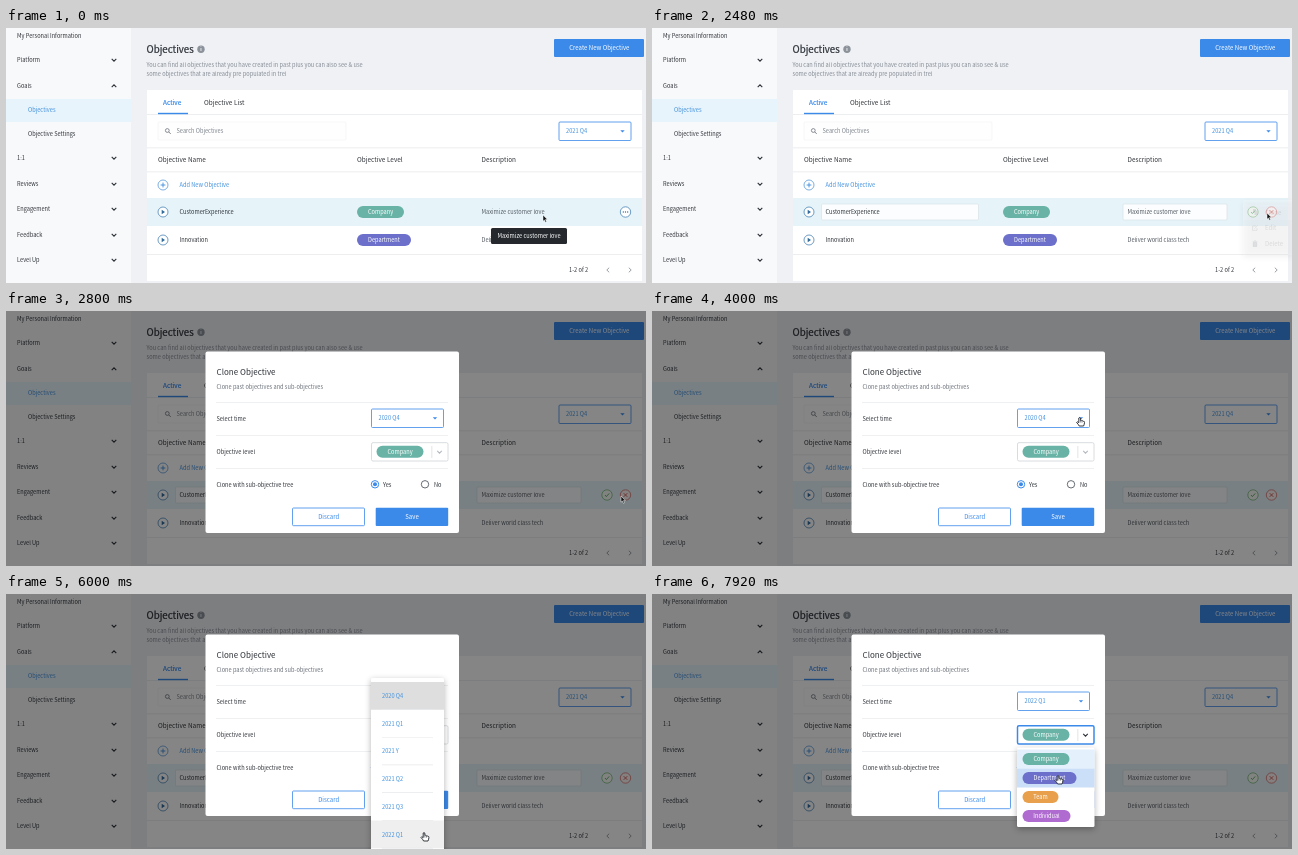
An HTML page with a canvas that plays this animation: 640x255 px, repeating every 8000 ms.

```html
<!DOCTYPE html>
<html lang="en">
<head>
<meta charset="utf-8">
<title>Objectives</title>
<style>
  html, body { margin: 0; width: 100%; height: 100%; overflow: hidden; }
  canvas { display: block; }
</style>
</head>
<body>
<canvas id="stage" width="640" height="255"></canvas>
<script>
const ctx = document.getElementById('stage').getContext('2d');
const LOOP = 8000, STEP = 80;
const FAMILY = '"Noto Sans CJK JP", "Noto Sans CJK SC", "Noto Sans CJK", "Open Sans", sans-serif';
const INK = '#2f3339', GREY = '#7d838b', PALE = '#e6e8eb', BLUE = '#3b8aea', LINK = '#3f8fdd';
const LEVELS = {
  Company: ['#69b3a6', 47], Department: ['#6c70ca', 54],
  Team: ['#e8a04c', 36], Individual: ['#b06bd0', 48]
};
const PERIODS = ['2020 Q4', '2021 Q1', '2021 Y', '2021 Q2', '2021 Q3', '2022 Q1'];

// Pointer keyframes: time, x, y
const POINTER = [
  [0, 537, 187], [80, 537, 187], [800, 619, 183], [1040, 618, 183], [1280, 616, 185],
  [1760, 616, 185], [2560, 615, 185], [2880, 615, 185], [3840, 428, 107], [4400, 426, 107],
  [4960, 426, 115], [5280, 424, 118], [6000, 418, 239], [6240, 418, 239], [6640, 422, 163],
  [6960, 433, 140], [7200, 433, 140], [7760, 408, 180], [7920, 406, 182]
];

const ramp = (t, from, to) => Math.min(1, Math.max(0, (t - from) / (to - from)));
const during = (t, from, to) => t >= from && t < to;

function pointerAt(t) {
  const i = POINTER.findIndex(p => p[0] > t);
  if (i < 0) return POINTER[POINTER.length - 1].slice(1);
  const [t0, x0, y0] = POINTER[i - 1], [t1, x1, y1] = POINTER[i];
  const u = ramp(t, t0, t1), e = u * u * (3 - 2 * u);
  return [x0 + (x1 - x0) * e, y0 + (y1 - y0) * e];
}

// Text is laid out large and scaled down, so small advances stay exact. y is the middle of the capitals.
function text(str, x, y, color = INK, px = 14, align = 'left', bold = 0) {
  ctx.save();
  ctx.translate(x, y + px * 0.148);
  ctx.scale(0.1, 0.1);
  ctx.font = `${px * 4.03}px ${FAMILY}`;
  ctx.textAlign = align;
  ctx.fillStyle = ctx.strokeStyle = color;
  ctx.fillText(str, 0, 0);
  if (bold) {
    ctx.lineWidth = bold * 10;
    ctx.strokeText(str, 0, 0);
  }
  ctx.restore();
}

function paint(fill, stroke, width = 0.8) {
  if (fill) { ctx.fillStyle = fill; ctx.fill(); }
  if (stroke) { ctx.strokeStyle = stroke; ctx.lineWidth = width; ctx.stroke(); }
}

function box(x, y, w, h, fill, stroke, r = 0, width) {
  ctx.beginPath();
  ctx.roundRect(x, y, w, h, r);
  paint(fill, stroke, width);
}

function circle(x, y, r, fill, stroke, width) {
  ctx.beginPath();
  ctx.arc(x, y, r, 0, 7);
  paint(fill, stroke, width);
}

function path(d, x, y, fill, stroke, width) {
  ctx.save();
  ctx.translate(x, y);
  const p = new Path2D(d);
  if (fill) { ctx.fillStyle = fill; ctx.fill(p); }
  if (stroke) { ctx.strokeStyle = stroke; ctx.lineWidth = width || 1; ctx.stroke(p); }
  ctx.restore();
}

function panel(x, y, w, h) {
  ctx.save();
  ctx.shadowColor = 'rgba(0,0,0,.3)';
  ctx.shadowBlur = 6;
  ctx.shadowOffsetY = 2;
  box(x, y, w, h, '#fff', null, 1.5);
  ctx.restore();
}

function faded(alpha, draw) {
  if (alpha <= 0) return;
  ctx.save();
  ctx.globalAlpha = alpha;
  draw();
  ctx.restore();
}

const line = (x, y, w, color = PALE) => box(x, y, w, 0.7, color);
const chevron = (x, y, color, up) => path(up ? 'M-2.3 1.2L0-1.2L2.3 1.2' : 'M-2.3-1.2L0 1.2L2.3-1.2', x, y, null, color, 1.1);
const caret = (x, y) => path('M-2.2-1.1H2.2L0 1.3Z', x, y, BLUE);

function pill(level, x, y) {
  const [color, w] = LEVELS[level];
  box(x, y - 6, w, 12, color, null, 6);
  text(level, x + w / 2, y, '#fff', 14, 'center');
}

function periodSelect(value, x, y, focused) {
  box(x, y, 72, 18.5, focused ? '#eef0f2' : '#fff', BLUE, 1, focused ? 1.6 : 0.8);
  text(value, x + 7, y + 9.3, LINK);
  caret(x + 63.5, y + 9.3);
}

function sidebar() {
  box(0, 0, 125, 255, '#f8f9fa');
  box(0, 71, 125, 23, '#e8f4fb');
  text('My Personal Information', 11, 8);
  text('Objectives', 22, 82, LINK);
  text('Objective Settings', 22, 106);
  const groups = { Platform: 32, Goals: 58, '1:1': 130, Reviews: 156, Engagement: 181, Feedback: 207, 'Level Up': 232 };
  for (const [name, y] of Object.entries(groups)) {
    text(name, 11, y);
    chevron(108, y, INK, name === 'Goals');
  }
}

function expander(y) {
  circle(157, y, 5, '#fff', '#4b83b5');
  path('M-1.3-2.2L2 0L-1.3 2.2Z', 157, y, '#2f6a9f');
}

function objectiveRow(editing) {
  box(141, 170, 495, 28, '#e6f4fa');
  expander(184);
  if (editing) {
    box(169.5, 176, 157, 16, '#fbfdfe', '#d5dde3', 1, 0.6);
    box(471, 176, 104, 16, '#fbfdfe', '#d5dde3', 1, 0.6);
    circle(601, 184, 5.2, '#f4fbf5', '#79b67c');
    path('M-2 0L-.6 1.6L2.2-1.6', 601, 184, null, '#5da562', 0.9);
    circle(619.5, 184, 5.2, '#fdf5f5', '#d4716f');
    path('M-1.8-1.8L1.8 1.8M1.8-1.8L-1.8 1.8', 619.5, 184, null, '#d0524f', 0.9);
  } else {
    circle(619.5, 184, 5.2, '#fff', '#4b83b5');
    for (const dx of [-2.2, 0, 2.2]) circle(619.5 + dx, 184, 0.65, '#2f6a9f');
  }
  text('CustomerExperience', 173.5, 184);
  pill('Company', 351, 184);
  text('Maximize customer love', 475.5, 184, '#555b63');
}

function page(editing) {
  box(0, 0, 640, 255, '#eff1f5');
  sidebar();
  text('Objectives', 140.5, 21, INK, 24, 'left', 0.25);
  circle(195, 21.3, 3.7, '#8c929a');
  text('i', 195, 21.3, '#fff', 13, 'center', 0.2);
  text('You can find all objectives that you have created in past plus you can also see & use', 140.5, 37.3, '#858b94');
  text('some objectives that are already pre populated in trel', 140.5, 46.3, '#858b94');
  box(548, 11, 90, 18, BLUE, null, 1);
  text('Create New Objective', 593.3, 20, '#fff', 15, 'center');

  box(141, 62, 495, 191, '#fff');
  text('Active', 157, 75, BLUE, 16, 'left', 0.2);
  text('Objective List', 198, 75, INK, 16);
  line(141, 86, 495);
  box(152, 84.8, 30, 1.4, BLUE);
  box(152, 94, 188, 18, '#fefefe', '#f1f2f4', 1, 0.6);
  circle(161.3, 102.5, 1.9, null, '#6d737b', 0.8);
  path('M0 0L2 2', 162.7, 103.9, null, '#6d737b', 0.9);
  text('Search Objectives', 170.5, 103.2, GREY);
  periodSelect('2021 Q4', 553, 94);

  line(141, 119.5, 495);
  text('Objective Name', 152, 131.3, INK, 16);
  text('Objective Level', 351, 131.3, INK, 16);
  text('Description', 475.5, 131.3, INK, 16);
  line(141, 143.5, 495);
  circle(157, 157, 5, '#fff', '#5b9bd8');
  path('M-2.4 0H2.4M0-2.4V2.4', 157, 157, null, LINK, 0.9);
  text('Add New Objective', 173.5, 157, LINK);
  objectiveRow(editing);
  expander(212);
  text('Innovation', 173.5, 212);
  pill('Department', 351, 212);
  text('Deliver world class tech', 475.5, 212, '#555b63');
  line(141, 226, 495);
  text('1-2 of 2', 563, 242);
  path('M1.2-2.3L-1.2 0L1.2 2.3', 602, 242, null, '#9aa0a7');
  path('M-1.2-2.3L1.2 0L-1.2 2.3', 624, 242, null, '#9aa0a7');
}

function tooltip() {
  box(485, 200, 76, 16, '#25292e', null, 1.5);
  text('Maximize customer love', 523, 208, '#fff', 14, 'center');
}

function actionMenu() {
  panel(591, 172, 52, 55);
  box(591, 176.5, 52, 15.5, '#f3f5f7');
  path('M-2-3H1V1H-2ZM-.5-1.5H2.5V3H-.5Z', 603, 184, '#858a91');
  path('M1-2H-2.4V2.4H2V0M-.6 .8L2.6-2.6', 603, 200, null, '#8a9098', 0.8);
  path('M-2.4-2H2.4M-1-2.8H1M-1.8-1H1.8V3H-1.8Z', 603, 215.5, '#8a9098', '#8a9098', 0.7);
  ['Clone', 'Edit', 'Delete'].forEach((s, i) => text(s, 613, 184.3 + i * 15.7, '#6c7179', 15));
}

function dialog(t) {
  const levelOpen = t >= 7120;
  box(199.5, 40.5, 253.5, 181.5, '#fff', null, 2);
  text('Clone Objective', 210.5, 61, INK, 20);
  text('Clone past objectives and sub-objectives', 210.5, 75.7, '#6a7078');
  for (const y of [91, 124, 157]) line(210, y, 232, '#e9ebed');
  text('Select time', 210.5, 107.5);
  periodSelect(t < 6160 ? '2020 Q4' : '2022 Q1', 365.5, 98, during(t, 6160, 7120));
  text('Objective level', 210.5, 141);
  box(365.5, 131.7, 76.5, 18.3, '#fff', levelOpen ? BLUE : '#cfd3d8', 1.5, levelOpen ? 1.5 : 0.8);
  pill('Company', 370.5, 140.8);
  box(425.6, 135, 0.6, 12, '#cfd3d8');
  chevron(433.5, 141, levelOpen ? INK : '#b5bac0');
  text('Clone with sub-objective tree', 210.5, 173.5);
  circle(369, 173.3, 3.7, '#fff', BLUE, 1);
  circle(369, 173.3, 2, BLUE);
  text('Yes', 377, 173.5);
  circle(419, 173.3, 3.7, '#fff', '#565c64', 0.9);
  text('No', 428, 173.5);
  box(286.5, 197, 72, 17.7, '#fff', BLUE, 1);
  text('Discard', 322.7, 206, BLUE, 15, 'center');
  box(369.7, 196.7, 72.5, 18.3, BLUE, null, 1);
  text('Save', 406, 206, '#fff', 15, 'center');
}

function periodMenu(pointerY) {
  const top = 88, pitch = 27.7;
  const hovered = Math.floor((pointerY - top) / pitch);
  panel(365, 84, 73, 190);
  PERIODS.forEach((name, i) => {
    const y = top + i * pitch;
    if (i === 0 || i === hovered) box(365, y, 73, pitch, i ? '#efefef' : '#dedede');
    text(name, 376, y + 14, LINK);
    line(376, y + pitch - 0.5, 51);
  });
}

function levelMenu(pointerY) {
  panel(365, 153.5, 77.5, 79.5);
  Object.keys(LEVELS).forEach((level, i) => {
    const y = 155.5 + i * 19;
    const hovered = pointerY >= y && pointerY < y + 19;
    if (hovered || i === 0) box(365, y, 77.5, 19, hovered ? '#cbe0f8' : '#e4f1fc');
    pill(level, 370.5, y + 9.5);
  });
}

function pointer(x, y, hand) {
  ctx.lineJoin = 'round';
  if (hand) {
    path('M-.8 0Q0-1 .8 0V2.4Q1.7 1.9 2.3 2.8Q3.3 2.4 3.8 3.3Q5 3.1 4.9 4.5Q4.8 6.2 4 8H-.4Q-1.2 6.3-3 4.5Q-2.7 3-.8 4.6Z',
      x, y, '#fff', '#20242a', 0.9);
    path('M.8 2.5V4.5M2.4 2.9V4.7', x, y, null, '#20242a', 0.5);
  } else {
    path('M0 0V6.2L1.4 5L2.4 7.3L3.5 6.8L2.5 4.6H4.4Z', x, y, '#111', '#fff', 0.5);
  }
  ctx.lineJoin = 'miter';
}

function draw(t) {
  const [x, y] = pointerAt(t);
  page(t >= 2480);
  faded(1 - ramp(t, 160, 400), tooltip);
  faded(Math.min(ramp(t, 920, 1120), 1 - ramp(t, 2320, 2520)), actionMenu);
  faded(0.48 * ramp(t, 2590, 2750), () => box(0, 0, 640, 255, '#000'));
  faded(ramp(t, 2580, 2655), () => dialog(t));
  faded(Math.min(ramp(t, 4080, 4260), 1 - ramp(t, 6120, 6300)), () => periodMenu(y));
  if (t >= 7120) levelMenu(y);
  const hand = during(t, 720, 2480) || t >= 3680;
  pointer(x, y, hand);
}

function frame(now) {
  draw(Math.floor(now % LOOP / STEP) * STEP);
  requestAnimationFrame(frame);
}
requestAnimationFrame(frame);
</script>
</body>
</html>
```
